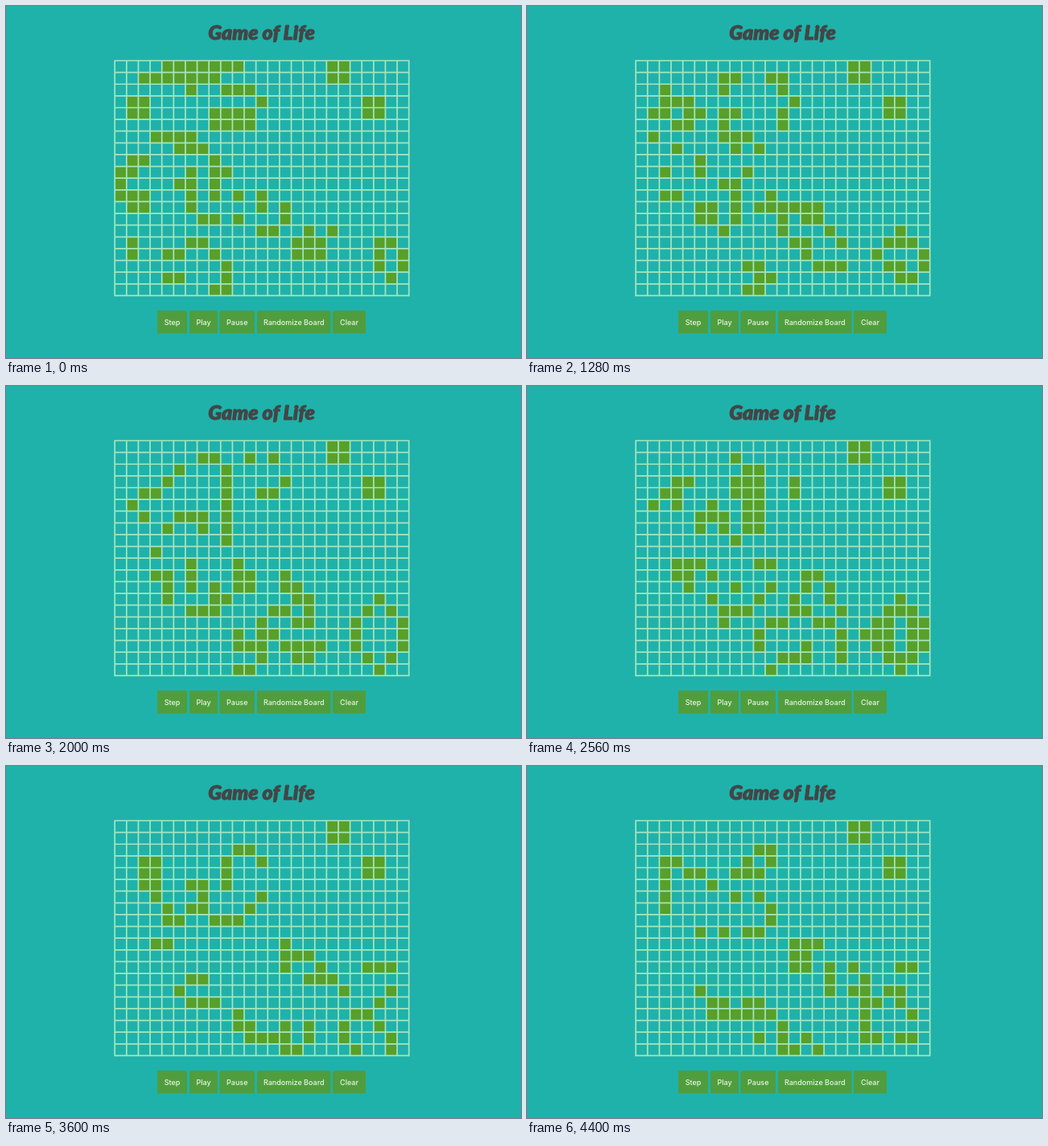
Write an HTML page that moves like this. It is 640 by 438 pixels and loops after 4.48 s.

```html
<!DOCTYPE html>
<html lang="en">
<head>
<meta charset="utf-8">
<title>Game of Life</title>
<style>
  html, body { margin: 0; width: 100%; height: 100%; overflow: hidden; background: #1fb2aa; }
  svg { display: block; width: 640px; height: 438px; }
  .title {
    font: italic 900 25px Lato, sans-serif;
    fill: #444546; stroke: #444546; stroke-width: .9; stroke-linejoin: round;
  }
  .label { font: 500 9px Inter, sans-serif; fill: #eaf6e4; }
  text { text-anchor: middle; }
  #grid { fill: none; stroke: #a6e6bd; stroke-width: 1.7; stroke-linecap: square; }
  #cells { fill: #58a02a; }
  .button { fill: #509d3e; }
</style>
</head>
<body>
<svg viewBox="0 0 640 438">
  <text class="title" x="317.5" y="42">Game of Life</text>
  <path id="cells"/>
  <path id="grid"/>
  <g id="buttons"></g>
</svg>
<script>
const COLS = 25, ROWS = 20, PITCH = 14.62, LEFT = 135.2, TOP = 68;
const LOOP = 4480, STEP = 400;

// Starting board in run-length notation: b = dead, o = alive, $ = next row.
const SEED =
  "4b7o7b2o$2b7o9b2o$6bo2b3o$b2o9bo8b2o$b2o5b4o9b2o$8b4o$3b4o$5b3o$" +
  "b2o5bo$2o4bob2o$o4b2obo$3o3bobobobo$b2o3bo5bobo$7b2obo3bo$" +
  "12b2o2bobo$bo4b2o7b3o4b2o$bo2b2o2bo6b3o4bobo$9bo12bobo$4b2o3bo13bo$8b2o";

const BUTTONS = [
  ["Step", 188, 225], ["Play", 228, 263], ["Pause", 265.5, 309],
  ["Randomize Board", 312, 403.5], ["Clear", 406, 447]
];

const byId = id => document.getElementById(id);
const x = col => LEFT + col * PITCH;
const y = row => TOP + row * PITCH;

function parse(seed) {
  return seed.split("$").map(line => {
    const row = Array(COLS).fill(0);
    let col = 0;
    for (const [, count, kind] of line.matchAll(/(\d*)([bo])/g)) {
      const end = col + Number(count || 1);
      if (kind === "o") row.fill(1, col, end);
      col = end;
    }
    return row;
  });
}

// The board has hard edges: nothing wraps around.
function neighbours(board, r, c) {
  let sum = -board[r][c];
  for (let i = r - 1; i <= r + 1; i++)
    for (let j = c - 1; j <= c + 1; j++) sum += board[i]?.[j] || 0;
  return sum;
}

function next(board) {
  return board.map((row, r) => row.map((alive, c) => {
    const n = neighbours(board, r, c);
    return n === 3 || (alive && n === 2) ? 1 : 0;
  }));
}

function outline(board) {
  let d = "";
  board.forEach((row, r) => row.forEach((alive, c) => {
    if (alive) d += `M${x(c)} ${y(r)}h${PITCH}v${PITCH}h${-PITCH}z`;
  }));
  return d;
}

function gridLines() {
  let d = "";
  for (let c = 0; c <= COLS; c++) d += `M${x(c)} ${TOP}V${y(ROWS)}`;
  for (let r = 0; r <= ROWS; r++) d += `M${LEFT} ${y(r)}H${x(COLS)}`;
  return d;
}

byId("grid").setAttribute("d", gridLines());
byId("buttons").innerHTML = BUTTONS.map(([name, from, to]) =>
  `<rect class="button" x="${from}" y="379" width="${to - from}" height="28.5" rx="1"/>` +
  `<text class="label" x="${(from + to) / 2}" y="396.5">${name}</text>`).join("");

const shapes = [];
for (let board = parse(SEED), t = 0; t < LOOP; t += STEP) {
  shapes.push(outline(board));
  board = next(board);
}

const start = performance.now();
let shown = -1;
function draw() {
  const time = (performance.now() - start) % LOOP;
  const step = Math.floor(time / STEP);
  if (step !== shown) byId("cells").setAttribute("d", shapes[shown = step]);
  requestAnimationFrame(draw);
}
draw();
</script>
</body>
</html>
```
